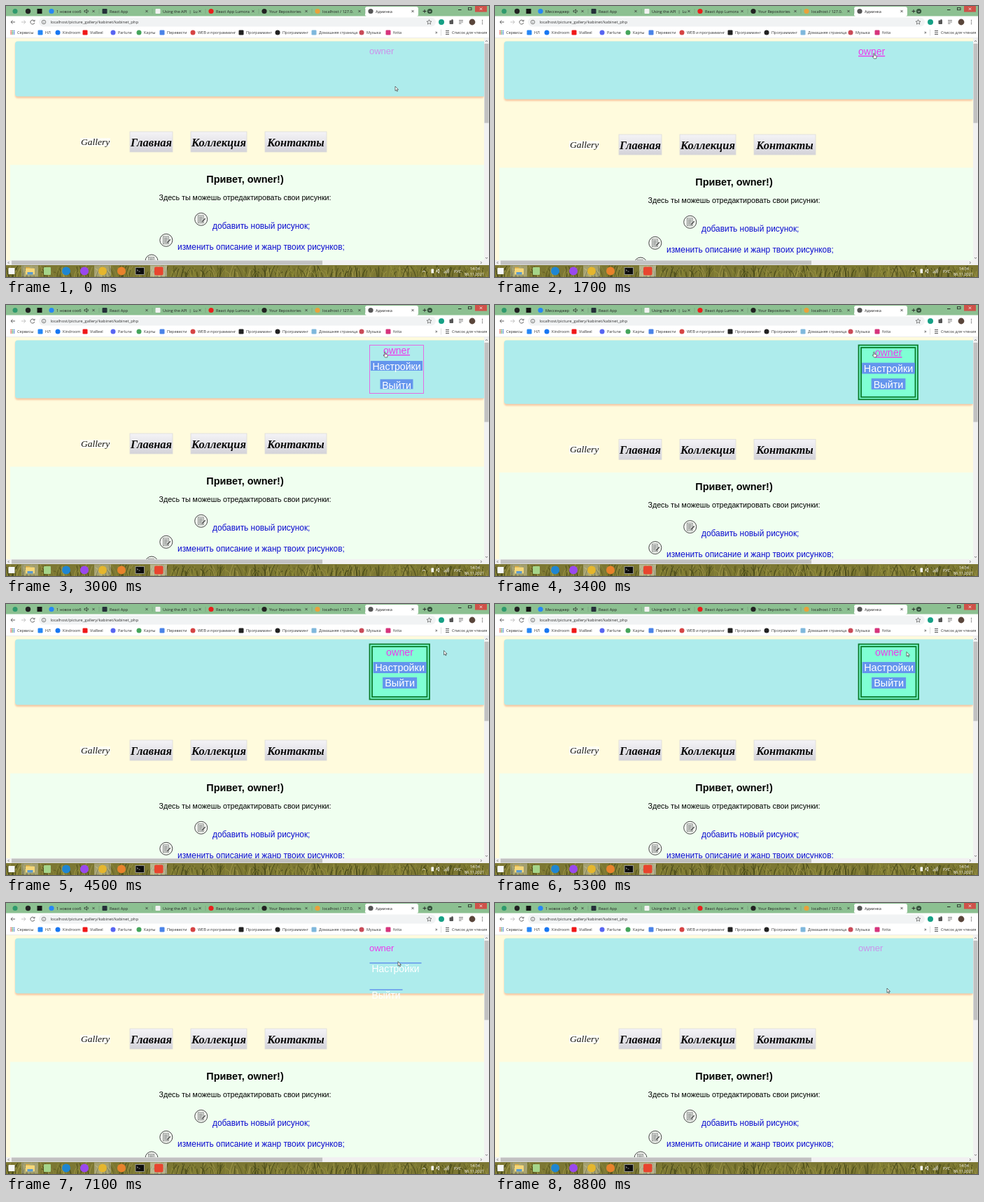
Write an HTML page that moves like this. It is 690 by 388 pixels and loops after 8.9 s.

```html
<!DOCTYPE html>
<html lang="ru">
<head>
<meta charset="utf-8">
<title>Админка</title>
<style>
html, body { margin: 0; width: 100%; height: 100%; overflow: hidden; background: #fffbdd; }
svg { display: block; width: 100vw; height: 100vh; }
text { white-space: pre; }
.ui { font-family: "Open Sans", "Noto Sans", sans-serif; }
.page { font-family: "Liberation Sans", Arial, sans-serif; }
.script { font-family: "Liberation Serif", "Times New Roman", serif; font-style: italic; }
</style>
</head>
<body>
<svg id="stage" viewBox="0 0 690 388">
  <defs>
    <linearGradient id="btn" x1="0" y1="0" x2="0" y2="1">
      <stop offset="0" stop-color="#f4f3f6"/><stop offset=".5" stop-color="#e6e5ea"/><stop offset="1" stop-color="#d3d2d8"/>
    </linearGradient>
    <filter id="soft" x="-5%" y="-20%" width="110%" height="140%"><feGaussianBlur stdDeviation="1.2"/></filter>
    <clipPath id="view"><rect y="46" width="683" height="318"/></clipPath>
    <clipPath id="bar"><rect y="371" width="690" height="17"/></clipPath>
  </defs>
</svg>
<script>
const NS = 'http://www.w3.org/2000/svg';
const LOOP = 8900;
const stage = document.getElementById('stage');

function set(el, attrs) {
  for (const k in attrs) el.setAttribute(k, attrs[k]);
  return el;
}
function add(parent, tag, attrs) {
  return parent.appendChild(set(document.createElementNS(NS, tag), attrs));
}
const rect = (p, x, y, width, height, fill, more) => add(p, 'rect', { x, y, width, height, fill, ...more });
const dot = (p, cx, cy, r, fill, more) => add(p, 'circle', { cx, cy, r, fill, ...more });
const line = (p, d, stroke, w = 0.8, fill = 'none') =>
  add(p, 'path', { d, stroke, 'stroke-width': w, fill });
function text(p, x, y, str, cls, more) {
  const el = add(p, 'text', { x, y, class: cls, ...more });
  el.textContent = str;
  return el;
}
const ui = (p, x, y, str, size = 5.5, more) =>
  text(p, x, y, str, 'ui', { 'font-size': size, fill: '#333', ...more });
const cross = (p, x, y, r, color) =>
  line(p, `M${x - r} ${y - r}l${2 * r} ${2 * r}m0 ${-2 * r}l${-2 * r} ${2 * r}`, color, 0.8);

// ---- web page ----
const page = add(stage, 'g', { 'clip-path': 'url(#view)' });
rect(page, 0, 46, 690, 318, '#fffbdd');
const glow = rect(page, 13, 52, 670, 80, '#f8c9a4', { rx: 4, filter: 'url(#soft)' });
const head = rect(page, 13, 50.5, 674, 79, '#aeecec', { rx: 4 });

const flow = add(page, 'g', {});
rect(flow, 106, 189, 43, 12, '#fffef4');
text(flow, 107, 199, 'Gallery', 'script', { 'font-size': 13.5, fill: '#111' });
[[177, 61, 'Главная'], [264, 80, 'Коллекция'], [370, 88, 'Контакты']].forEach(([x, w, label]) => {
  rect(flow, x, 180, w, 29, 'url(#btn)', { stroke: '#dcdbd9', 'stroke-width': 0.8 });
  text(flow, x + w / 2, 201, label, 'script',
    { 'font-size': 16.5, 'font-weight': 'bold', 'text-anchor': 'middle', fill: '#080808' });
});
rect(flow, 6, 227.5, 677, 160, '#f0fff0');
text(flow, 341.5, 253, 'Привет, owner!)', 'page',
  { 'font-size': 14.4, 'font-weight': 'bold', 'text-anchor': 'middle' });
text(flow, 341.5, 278, 'Здесь ты можешь отредактировать свои рисунки:', 'page',
  { 'font-size': 10.7, 'text-anchor': 'middle' });

function noteIcon(x, y) {
  const g = add(flow, 'g', { transform: `translate(${x} ${y})` });
  dot(g, 0, 0, 9, '#f4f8f2', { stroke: '#444', 'stroke-width': 1 });
  rect(g, -4.5, -5.5, 8, 11, '#d8dcd8', { stroke: '#777', 'stroke-width': 0.7 });
  line(g, 'M-3 -3h5m-5 2h5m-5 2h4m-4 2h3', '#666', 0.7);
  line(g, 'M1 4l5 -5', '#555', 1.6);
}
noteIcon(278.7, 305.3);
noteIcon(228.8, 335.3);
noteIcon(208, 365);
text(flow, 295, 319, 'добавить новый рисунок;', 'page', { 'font-size': 11.9, fill: '#0a0ad0' });
text(flow, 245, 349, 'изменить описание и жанр твоих рисунков;', 'page', { 'font-size': 11.9, fill: '#0a0ad0' });

// ---- drop-down menu ----
const menu = add(page, 'g', {});
const frame = rect(menu, 519.5, 57.5, 77, 69, 'none');
const inner = rect(menu, 523, 61, 79, 72, 'none', { stroke: '#0b7d2c', 'stroke-width': 1.8 });
const user = text(menu, 519, 69, 'owner', 'page', { fill: '#ec3aec' });
const items = [['Настройки', 74, 76], ['Выйти', 47, 49]].map(([label, shut, open]) => {
  const g = add(menu, 'g', {});
  return {
    g, shut, open,
    bg: rect(g, 0, 0, shut, 0, '#6495ed'),
    label: text(g, 0, 0, label, 'page', { fill: '#fff', 'text-anchor': 'middle' })
  };
});

// ---- scroll bars ----
rect(stage, 683, 46, 7, 325, '#f1f1f1');
rect(stage, 683.5, 54, 6, 113.5, '#c1c1c1');
rect(stage, 0, 364, 683, 7, '#f1f1f1');
rect(stage, 8, 364.5, 444, 6, '#c1c1c1');
line(stage, 'M685 51l1.5 -1.5l1.5 1.5M685 360l1.5 1.5l1.5 -1.5M4.5 366l-1.5 1.5l1.5 1.5M678 366l1.5 1.5l-1.5 1.5', '#555');

// ---- browser tabs ----
rect(stage, 0, 0, 690, 15, '#8cc091');
rect(stage, 513, 1, 76, 14, '#fff', { rx: 3 });
dot(stage, 13, 7.5, 3.5, '#2f9a6d');
dot(stage, 31.5, 7.5, 3.7, '#222');
rect(stage, 44.5, 4, 7, 7, '#151515');
const tabs = [
  ['1 новое сооб', '#2787f5'], ['React App', '#25303a'], ['Using the API  |  Lu', '#f2f2f2'],
  ['React App Lumora', '#e8201c'], ['Your Repositories', '#222'], ['localhost / 127.0.', '#e9a13b'], ['Админка', '#555']
].map(([label, color], i) => {
  const x = 65 + i * 76;
  if (i === 1 || i === 2) rect(stage, x - 3.5, 4, 7, 7, color, { rx: 1 });
  else dot(stage, x, 7.5, 3.6, color);
  if (i < 6) line(stage, `M${x + 68} 4v7`, '#6c9a70', 0.5);
  cross(stage, x + 60, 7.5, 1.6, '#333');
  return ui(stage, x + 7, 9.6, label, 5.6, { fill: '#222' });
});
line(stage, 'M112 6.5h1.5l2 -1.7v5.4l-2 -1.7h-1.5zM117 6q1.2 1.5 0 3', '#222', 0.7);
line(stage, 'M595.5 7.5h5m-2.5 -2.5v5', '#222', 0.9);
dot(stage, 605.5, 7.5, 3.6, '#33513a');
line(stage, 'M604 7l1.5 1.5l1.5 -1.5', '#fff', 0.7);
rect(stage, 670, 0, 17, 8.5, '#cf5149');
line(stage, 'M646 5.5h4.5', '#222', 1);
rect(stage, 660.5, 2.5, 4.5, 3.2, 'none', { stroke: '#222', 'stroke-width': 0.8 });
cross(stage, 678.5, 4.2, 1.7, '#fff');

// ---- address bar ----
rect(stage, 0, 14.5, 690, 31.5, '#fff');
rect(stage, 47, 16.5, 567, 13, '#f1f3f4', { rx: 6.5 });
line(stage, 'M13 23h-6m2.5 -2.5l-2.5 2.5l2.5 2.5', '#555', 0.9);
line(stage, 'M22 23h6m-2.5 -2.5l2.5 2.5l-2.5 2.5', '#bbb', 0.9);
line(stage, 'M40.5 21.5a3 3 0 1 0 .3 2.5M41 19.8v2h-2', '#555', 0.9);
dot(stage, 54, 23, 2.8, 'none', { stroke: '#555', 'stroke-width': 0.7 });
line(stage, 'M54 22.7v1.8m0 -3.2v.6', '#555', 0.7);
ui(stage, 63.5, 25, 'localhost/picture_gallery/kabinet/kabinet_php', 5.9);
line(stage, 'M604.5 19.6l1 2.3l2.5 .2l-1.9 1.6l.6 2.4l-2.2 -1.3l-2.2 1.3l.6 -2.4l-1.9 -1.6l2.5 -.2z', '#555', 0.7);
dot(stage, 622, 23, 4, '#16a085');
rect(stage, 633.5, 20.5, 5.5, 5.5, '#555', { rx: 1 });
dot(stage, 637.5, 20.3, 1.2, '#555');
line(stage, 'M647 20.5h6m-6 2.3h6m-6 2.3h3.5', '#555', 0.8);
dot(stage, 666, 23, 4.4, '#5a463b');
[20.5, 23, 25.5].forEach(y => dot(stage, 680.5, y, 0.7, '#555'));

// ---- bookmarks ----
for (let i = 0; i < 9; i++)
  rect(stage, 6.5 + (i % 3) * 2.2, 34.8 + Math.floor(i / 3) * 2.2, 1.5, 1.5, ['#e05144', '#3f9a55', '#4a7fe0'][i % 3]);
[
  [16, 'Сервисы'], [56, 'НЛ', '#2787f5', 1], [81, 'Kindroom', '#1877f2'], [120, 'ViaReel', '#f01818', 1],
  [160, 'Parlune', '#5865f2'], [197, 'Карты', '#45a55b'], [230, 'Перевести', '#4a83e8', 1],
  [274, 'WEB и программинг', '#d64444'], [343, 'Программинг', '#222', 1], [395, 'Программинг', '#222'],
  [447, 'Домашняя страница', '#7fb8dc', 1], [515, 'Музыка', '#c94b58'], [553, 'fotta', '#d6347c', 1]
].forEach(([x, label, color, square]) => {
  if (color && square) rect(stage, x - 10.5, 34.5, 7, 7, color, { rx: 1.3 });
  else if (color) dot(stage, x - 7, 38, 3.5, color);
  ui(stage, x, 39.9, label);
});
ui(stage, 613, 40, '»', 7);
line(stage, 'M621.5 33.5v9', '#ccc', 0.6);
line(stage, 'M628 35.5h5m-5 2.5h5m-5 2.5h5', '#444', 0.9);
ui(stage, 637, 39.9, 'Список для чтения');
line(stage, 'M0 45.7h690', '#dedede', 0.6);

// ---- task bar with grass ----
const bar = add(stage, 'g', { 'clip-path': 'url(#bar)' });
rect(bar, 0, 371, 690, 17, '#7c7733');
let seed = 7;
const rnd = () => (seed = (seed * 16807) % 2147483647) / 2147483647;
['#5b5a1f', '#a39a4b', '#434618', '#8d8a38'].forEach(color => {
  let d = '';
  for (let i = 0; i < 120; i++) {
    const x = rnd() * 690, lean = rnd() * 16 - 8;
    d += `M${x.toFixed(1)} 389q${(lean * 0.2).toFixed(1)} -8 ${lean.toFixed(1)} ${(-8 - rnd() * 10).toFixed(1)}`;
  }
  line(bar, d, color, 0.9);
});
[34, 138, 218].forEach(x => rect(bar, x - 12, 371.5, 24, 16, '#fff', { opacity: x === 218 ? 0.45 : 0.3 }));
rect(bar, 3.5, 375, 9, 9, '#f4f6f4');
rect(bar, 28, 374, 6, 3, '#d9a940');
rect(bar, 28, 375.5, 13, 9, '#f5d778', { rx: 0.8 });
rect(bar, 30.5, 381, 8, 3.5, '#5b9bd0');
rect(bar, 54, 374, 10, 11, '#a5d58a', { rx: 1 });
[[86, '#1f86d2'], [112, '#9a48ee'], [138, '#e5b62d'], [165, '#e8822c']].forEach(([x, c]) => dot(bar, x, 379.5, 6, c));
rect(bar, 185, 374.5, 12.5, 10, '#0c0c0c', { stroke: '#aaa', 'stroke-width': 0.8 });
line(bar, 'M187 377.5l1.5 1l-1.5 1m2.5 .5h2', '#eee', 0.6);
rect(bar, 212, 373.5, 12.5, 12, '#e8442e', { rx: 2 });
line(bar, 'M595 381l2 -2l2 2', '#fff', 0.8);
rect(bar, 607.5, 376.5, 3.5, 6, '#fff', { rx: 0.6 });
line(bar, 'M615 378.5h1.5l2 -2v6l-2 -2h-1.5zM626 382.5v-2m2 2v-3.5m2 3.5v-5m2 5v-6.5', '#fff', 0.8);
[[645, 382, 'РУС'], [670, 378.4, '14:34'], [669, 386.2, '06.11.2021']].forEach(([x, y, s]) =>
  ui(bar, x, y, s, 5.5, { fill: '#fff', 'text-anchor': 'middle' }));

// ---- pointer ----
const pointer = add(stage, 'g', {});
const arrow = line(pointer, 'M0 0v6.4l1.5 -1.3l1 2.2l1 -.5l-1 -2.1h2z', '#222', 0.6, '#fff');
const hand = line(pointer, 'M-.2 .6q.6 -.9 1.2 0v2.7l2.6 .6q.8 .3 .6 1.2l-.6 2.8h-3.2l-2 -2.6q-.2 -.9 .7 -.7l.7 .7z', '#222', 0.6, '#fff');

// ---- motion: pairs of time and value ----
const tracks = {
  shift: [1250, 0, 1500, 4, 3100, 4, 3500, 15, 6550, 15, 6950, 0],
  size: [1250, 13, 1500, 14, 3100, 14, 3500, 14.35, 6550, 14.35, 6950, 13],
  base: [1250, 68.7, 1500, 70, 3100, 70, 3500, 74, 6550, 74, 6950, 68.5],
  glow: [1150, 0.5, 1450, 1, 7200, 1, 7900, 0.5],
  tall: [2500, 0, 3000, 14, 3450, 16, 6550, 16, 7050, 2, 7250, 0],
  first: [2500, 85, 3000, 80, 3450, 83, 6550, 83, 7050, 85.2],
  second: [2500, 123, 3000, 106.3, 3450, 105, 6550, 105, 7050, 123.5],
  show: [2500, 0, 2650, 1, 7150, 1, 7450, 0],
  grow: [3050, 0, 3450, 1],
  px: [800, 556, 1400, 541, 3500, 541, 4200, 625.5, 4900, 625.5, 5600, 560],
  py: [800, 115, 1400, 67.5, 4900, 66.5, 5600, 70, 6600, 70, 7000, 79, 7900, 122]
};
function at(name, t) {
  const k = tracks[name];
  if (t <= k[0]) return k[1];
  for (let i = 2; i < k.length; i += 2)
    if (t < k[i]) return k[i - 1] + (k[i + 1] - k[i - 1]) * (t - k[i - 2]) / (k[i] - k[i - 2]);
  return k[k.length - 1];
}
const visible = on => ({ visibility: on ? 'visible' : 'hidden' });

function draw(t) {
  const shift = at('shift', t), grow = at('grow', t);
  const open = t >= 2500 && t < 6600;
  const green = open && t >= 3300;
  const hover = (t >= 1350 && t < 3550) || (t >= 5500 && t < 6600);

  set(head, { height: 79 + shift });
  set(glow, { height: 80 + shift });
  set(flow, { transform: `translate(0 ${shift})` });

  set(frame, {
    width: 77 + 8.5 * grow, height: 69 + 10 * grow, ...visible(open),
    fill: green ? '#7fffd4' : 'none', stroke: green ? '#0b7d2c' : '#e46be4', 'stroke-width': green ? 1.8 : 1
  });
  set(inner, { width: 70 + 8.5 * grow, height: 62 + 10 * grow, ...visible(green) });

  const mid = 558 + 4.6 * grow;
  set(user, {
    x: open ? mid : 519, y: at('base', t), 'font-size': at('size', t), 'text-anchor': open ? 'middle' : 'start',
    'fill-opacity': at('glow', t), 'text-decoration': hover ? 'underline' : 'none'
  });

  const tall = at('tall', t), show = at('show', t);
  items.forEach((item, i) => {
    const y = at(i ? 'second' : 'first', t);
    const w = open ? item.shut + (item.open - item.shut) * grow : item.shut;
    const x = open ? mid - w / 2 : 519.5;
    set(item.g, { opacity: show });
    set(item.bg, { x, y, width: w, height: tall });
    set(item.label, { x: x + w / 2, y: y + 13.4, 'font-size': open ? 14.1 + 0.35 * grow : 13.9 });
  });

  tabs[0].textContent = Math.floor(t / 1000 - 0.2) % 2 === 1 ? 'Мессенджер' : '1 новое сооб';
  set(pointer, { transform: `translate(${at('px', t)} ${at('py', t)})` });
  set(arrow, visible(!hover));
  set(hand, visible(hover));
}

function tick() {
  draw(performance.now() % LOOP);
  requestAnimationFrame(tick);
}
tick();
</script>
</body>
</html>
```
